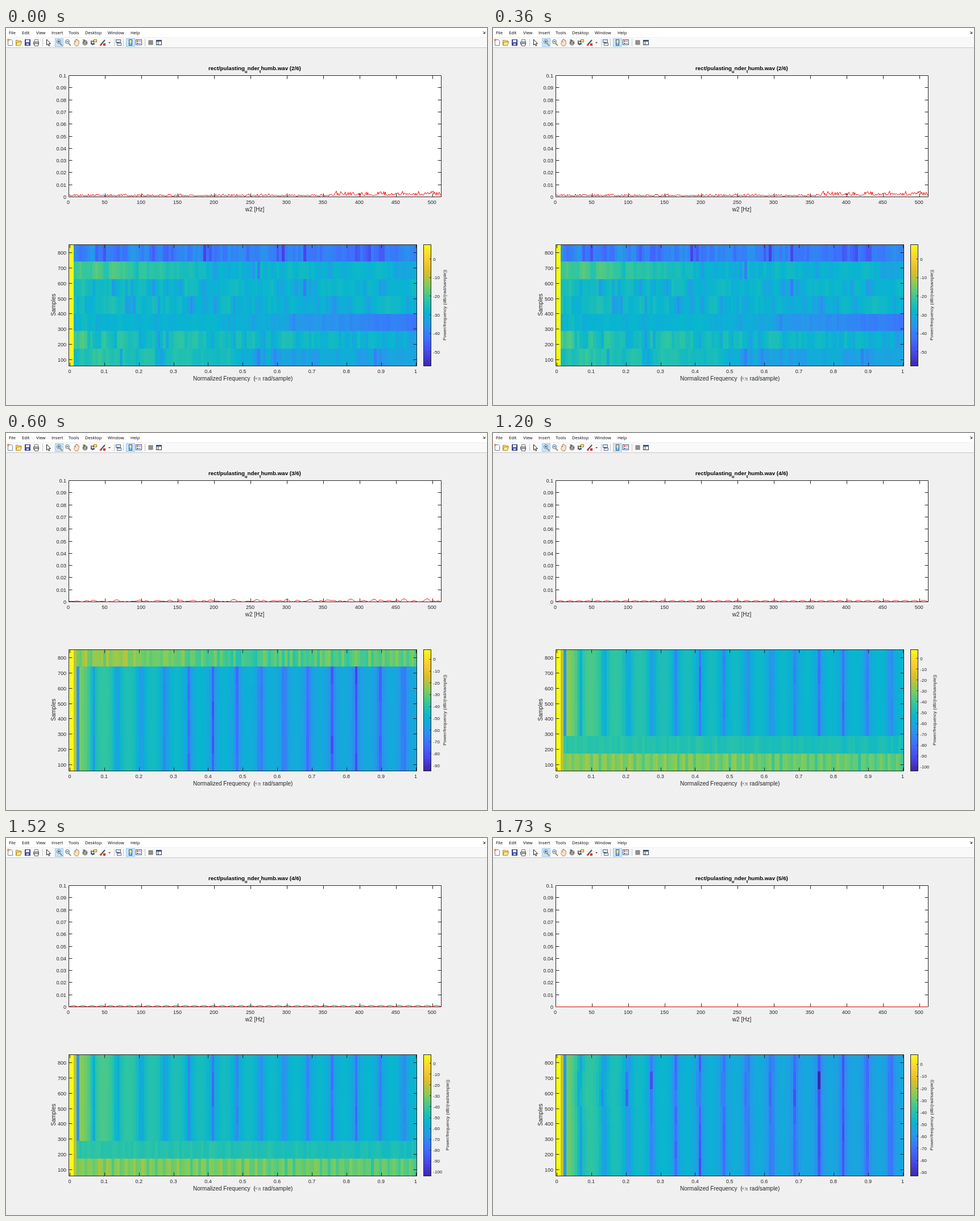
Animation of 846x662 px, one loop 2070 ms. Source, as an HTML page with a canvas:

```html
<!DOCTYPE html>
<html lang="en">
<head>
<meta charset="utf-8">
<title>Spectrum viewer</title>
<style>
html, body { margin: 0; width: 100%; height: 100%; overflow: hidden; background: #f0f0f0; }
canvas, svg { position: absolute; left: 0; top: 0; width: 846px; height: 662px; display: block; }
text { font-family: "Liberation Sans", Arial, sans-serif; fill: #262626; white-space: pre; }
.menu text { font: 7.6px "Open Sans", "Noto Sans", sans-serif; fill: #000; }
.tick { font-size: 9px; }
.label { font-size: 10px; }
.math { font: 11px "Liberation Serif", serif; fill: #555; }
.small { font-size: 8px; }
.title text { font-size: 9.75px; font-weight: bold; fill: #000; }
.title .sub { font-size: 7.6px; }
.axis { stroke: #262626; stroke-width: 1; fill: none; }
</style>
</head>
<body>
<canvas id="heat" width="846" height="662"></canvas>
<svg id="ui" viewBox="0 0 846 662"></svg>
<script>
const LOOP = 2070;
const BINS = 129, ROWS = 7, HZ = 512;
const PLOT = { x: 110, y: 83, w: 655, h: 213 };
const MAP = { x: 110, y: 380, w: 612, h: 213 };
const BIN_W = 608.5 / 128, BIN_X = 112 - BIN_W / 2;

// Start time, dB limits and content of each page
const PAGES = [
  { at: 0,    lo: -57.5,  hi: 7.7, cell: noiseCells,   height: noiseTrace },
  { at: 600,  lo: -94.8,  hi: 8.2, cell: impulseCells, height: rippleTrace },
  { at: 1200, lo: -103.7, hi: 7.9, cell: combCells,    height: combTrace },
  { at: 1730, lo: -93,    hi: 8,   cell: quietCells,   height: () => () => 0 }
];

const PARULA = ['3e26a8', '4747eb', '3e6ffe', '2797eb', '08b5d0', '31c69f', '81cc59', 'dcbd29', 'fccf30', 'f9fb15']
  .map(hex => [0, 2, 4].map(i => parseInt(hex.slice(i, i + 2), 16)));

const mix = (a, b, f) => a + (b - a) * f;
const clamp = (v, lo, hi) => Math.max(lo, Math.min(hi, v));
const dB = v => 20 * Math.log10(v);

// Evenly spaced key values, u from 0 to 1
function along(keys, u) {
  const p = u * (keys.length - 1), i = Math.min(keys.length - 2, Math.floor(p));
  return mix(keys[i], keys[i + 1], p - i);
}

function colour(v) {
  const u = clamp(v, 0, 1);
  return `rgb(${[0, 1, 2].map(c => Math.round(along(PARULA.map(p => p[c]), u))).join()})`;
}

function random(seed) {
  return () => {
    seed = (seed + 0x6D2B79F5) | 0;
    let t = Math.imul(seed ^ (seed >>> 15), 1 | seed);
    t = (t + Math.imul(t ^ (t >>> 7), 61 | t)) ^ t;
    return ((t ^ (t >>> 14)) >>> 0) / 4294967296;
  };
}

// Spectrum of a 29 sample pulse over a faint noise floor, scaled to 0..1
function pulse(page, rnd, k, drift = 0) {
  if (k < 2) return 1;
  if (k === 2) return .74;
  if (k === 3) return .34;
  const lobe = Math.abs(Math.sin(Math.PI * (k + drift) * 29 / 256));
  const level = -54 + dB((lobe + .05 * rnd()) / Math.sin(Math.PI * k / 256));
  return (level - page.lo) / (page.hi - page.lo);
}

// Each cell maker returns a rule (row, bin) -> 0..1
function noiseCells() {
  // left, middle and right level, then spread
  const bands = [
    [.30, .27, .25, .5], [.60, .44, .41, .4], [.50, .43, .42, .45], [.47, .42, .41, .5],
    [.46, .42, .22, .25], [.54, .45, .42, .55], [.54, .40, .34, .5]
  ];
  const rnd = random(41);
  const fade = v => .8 * v + 1.2 * (rnd() + rnd() + rnd() - 1.5);
  let re = 1, im = 1;
  return (r, k) => {
    re = fade(re);
    im = fade(im);
    if (k < 2) return 1;
    const [left, mid, right, spread] = bands[r];
    return along([left, mid, right], k / 128) + spread * (dB(Math.hypot(re, im) / 1.41) + 2.5) / 65;
  };
}
function impulseCells(page) {
  const rnd = random(12);
  return (r, k) => r || k < 3 ? pulse(page, rnd, k) : along([.68, .67, .58, .6, .64], k / 128) + (rnd() - .5) * .13;
}
function combCells(page) {
  const rnd = random(77);
  return (r, k) => {
    if (r < 5 || k < 3) return pulse(page, rnd, k);
    const n = (rnd() - .5) * .05;
    if (r === 5) return mix(.54, .49, k / 128) + n;
    return mix(.6, .55, k / 128) + .1 * Math.abs(Math.sin(Math.PI * k / 3.2)) + n;
  };
}
function quietCells(page) {
  const rnd = random(9);
  return (r, k) => pulse(page, rnd, k, Math.exp(-((r - 1.7) ** 2)) * .7 * (1 - k / 128));
}

// Each trace maker returns a rule (frequency) -> height in pixels
function noiseTrace() {
  const rnd = random(5);
  let last = 0;
  return f => {
    last = mix(last, rnd(), .75);
    return (.7 + 5 * last * last) * (f < 365 ? 1 : 1.8) + (f < 365 ? .5 : 1);
  };
}
function rippleTrace() {
  return f => Math.abs(Math.sin(f * .118) + .7 * Math.sin(f * .31 + .2) + .6 * Math.sin(f * .47 + 2)) * mix(1.4, 2.6, f / HZ);
}
function combTrace() {
  return f => mix(1.9, 2.5, f / HZ) * Math.abs(Math.sin(Math.PI * f / 12.8));
}

const ctx = document.getElementById('heat').getContext('2d');

function fill(style, x, y, w, h) {
  ctx.fillStyle = style;
  ctx.fillRect(x, y, w, h);
}

function drawPage(page) {
  fill('#f0f0f0', 0, 0, 846, 662);
  fill('#fff', 0, 0, 846, 17);
  fill('#f9f9f9', 0, 17, 846, 17);
  fill('#fff', PLOT.x, PLOT.y, PLOT.w, PLOT.h);
  const cell = page.cell(page);
  const edgeX = k => Math.round(BIN_X + k * BIN_W), edgeY = r => Math.round(MAP.y + r * MAP.h / ROWS);
  for (let r = 0; r < ROWS; r++)
    for (let k = 0; k < BINS; k++)
      fill(colour(cell(r, k)), edgeX(k), edgeY(r), edgeX(k + 1) - edgeX(k), edgeY(r + 1) - edgeY(r));
  for (let y = 0; y < MAP.h; y++) fill(colour(1 - y / MAP.h), 735, MAP.y + y, 13, 1);
}

const text = (x, y, s, cls = 'tick', anchor = 'middle', extra = '') =>
  `<text x="${x}" y="${y}" class="${cls}" text-anchor="${anchor}" ${extra}>${s}</text>`;
const upright = (x, y, s, cls) => text(0, 0, s, cls, 'middle', `transform="translate(${x} ${y}) rotate(-90)"`);
const path = (d, stroke, fill = 'none', w = 1) => `<path d="${d}" stroke="${stroke}" fill="${fill}" stroke-width="${w}"/>`;
const rect = (x, y, w, h, fill, stroke = 'none') => `<rect x="${x}" y="${y}" width="${w}" height="${h}" fill="${fill}" stroke="${stroke}"/>`;
const disc = (x, y, r, fill, stroke = 'none') => `<circle cx="${x}" cy="${y}" r="${r}" fill="${fill}" stroke="${stroke}"/>`;
const snap = v => Math.round(v) + .5;
const steps = (n, size, from = 0) => Array.from({ length: n }, (_, i) => from + i * size);

function axes(box, xs, ys) {
  const l = snap(box.x), t = snap(box.y), r = snap(box.x + box.w), b = snap(box.y + box.h);
  let d = `M${l} ${t}H${r}V${b}H${l}Z`;
  for (const x of xs) d += `M${snap(x)} ${t}v6M${snap(x)} ${b}v-6`;
  for (const y of ys) d += `M${l} ${snap(y)}h6M${r} ${snap(y)}h-6`;
  return `<path class="axis" d="${d}"/>`;
}

function icons() {
  const lens = (x, d) => path(`M${x + 2} 27l4 4`, '#b88746', 'none', 2) + disc(x, 24, 3.5, '#e3f2ff', '#51779b') + path(d, '#235');
  return [
    rect(86.5, 18.5, 14, 14, '#cce4f7', '#9bcaef'), rect(211.5, 18.5, 15, 14, '#cce4f7', '#9bcaef'),
    path('M3.5 20.5h6l2 2v8h-8z', '#6d8299', '#fff'), disc(4, 21, 2, '#e58b43'),
    path('M17.5 30.5v-9h4l1 1h4v2', '#b88a25', '#f8d56b'), path('M17.5 30.5l2-6h8l-2 6z', '#b88a25', '#ffe58f'),
    rect(33.5, 20.5, 9, 10, '#4550a8', '#303878'), rect(35, 21, 6, 4, '#eef'), rect(36, 27, 4, 3, '#ccd'),
    rect(50.5, 20.5, 6, 4, '#fff', '#777'), rect(48.5, 24.5, 9, 4, '#b9bec5', '#555'), rect(50.5, 27.5, 6, 4, '#fff', '#666'),
    path('M71.5 20v10l2.3-2 1.5 3.5 1.6-.7-1.5-3.4h3z', '#222', '#fff'),
    lens(93, 'M91 24h4M93 22v4'), lens(108, 'M106 24h4'),
    path('M121 25l-1-2 1-.5 1.5 2v-4h1v-1h1v1h1.3v1h1.4v1h1v5l-2 4h-4l-3-4z', '#9a704f', '#fbe1c5', .8),
    disc(139, 26, 4, '#ddd', '#555'), path('M135 21l4 0-2 3M136 26l3-2 3 2-3 2z', '#333'),
    path('M150 22v6h6M153 25v-3', '#222', 'none', 1.4), rect(154.5, 20.5, 5, 4, '#ffe476', '#927e2f'), path('M152 30l3-4', '#24559b', 'none', 1.5),
    path('M167 29l7-8', '#555', 'none', 2), path('M165 30q2-4 4-1q-2 3-4 1', '#b44', '#d44'), rect(171, 27, 4, 4, '#d91e1e'),
    path('M180 25h4l-2 2z', 'none', '#333'),
    rect(193.5, 20.5, 8, 5, '#dce8f6', '#536b8c'), rect(195.5, 26.5, 7, 4, '#fff', '#536b8c'), path('M195 25l4 2', '#222'),
    rect(216.5, 20.5, 5, 10, '#ffe38b', '#31588e'), rect(217, 26, 4, 4, '#7bc7e5'),
    rect(228.5, 20.5, 10, 9, '#fff', '#445c83'), rect(230, 22, 3, 2, '#d33'), rect(230, 26, 3, 2, '#36b'), path('M234 23h3M234 27h3', '#444'),
    rect(251, 22, 7, 7, '#929292', '#777'),
    rect(264.5, 21.5, 9, 8, '#fff', '#27364f'), rect(265, 22, 9, 2, '#4c6589'), path('M267.5 24v5', '#27364f'),
    path('M64.5 19v13M190.5 19v13M206.5 19v13M244.5 19v13', '#c5c5c5')
  ].join('');
}

function chrome() {
  const menu = { File: 5, Edit: 28, View: 53, Insert: 80, Tools: 110, Desktop: 139, Window: 179, Help: 219 };
  let s = '<g class="menu">' + Object.entries(menu).map(([name, x]) => text(x, 11, name, '', 'start')).join('') + '</g>';
  s += path('M839 6l3 3M842.5 6.5v3h-3', '#333');
  s += path('M0 16.5H846', '#f0f0f0') + path('M0 34.5H846', '#c8c8c8') + icons();

  const hz = steps(11, 50), tenths = steps(11, .1);
  const px = v => PLOT.x + v * PLOT.w / HZ, py = v => PLOT.y + PLOT.h * (1 - v);
  s += axes(PLOT, hz.slice(1).map(px), tenths.slice(1, 10).map(py));
  for (const v of hz) s += text(px(v) - .4, 309, v);
  for (const v of tenths) s += text(106, py(v) + 4, +(v / 10).toFixed(2), 'tick', 'end');
  s += text(437.5, 322, 'w2 [Hz]', 'label');

  const mx = v => 112 + v * 608.5, my = v => 581.5 - (v - 100) * .2675;
  const samples = steps(8, 100, 100);
  s += axes(MAP, tenths.map(mx), samples.map(my));
  for (const v of tenths) s += text(mx(v), 606, +v.toFixed(1));
  for (const v of samples) s += text(106, my(v) + 4, v, 'tick', 'end');
  s += upright(87, 486, 'Samples', 'label');
  s += text(329, 619, 'Normalized Frequency  (', 'label', 'start') + text(436.5, 619, '×π', 'math', 'start') +
    text(451.5, 619, 'rad/sample)', 'label', 'start');
  s += rect(734.5, 380.5, 13, 213, 'none', '#262626');

  s += '<g class="title">' + text(356, 74, 'rect/pulasting', '', 'start') + text(419.8, 79, 'u', 'sub', 'start') +
    text(424.6, 74, 'nder', '', 'start') + text(445.8, 79, 't', 'sub', 'start') +
    text(448.4, 74, '', '', 'start', 'id="count"') + '</g>';
  return s + '<g id="scale"></g><path id="trace" stroke="#f00" fill="none" stroke-linejoin="round"/>';
}

document.getElementById('ui').innerHTML = chrome();
const [count, scale, trace] = ['count', 'scale', 'trace'].map(id => document.getElementById(id));

function show(index) {
  const page = PAGES[index], height = page.height();
  drawPage(page);
  count.textContent = `humb.wav (${index + 2}/6)`;
  let s = '';
  for (let v = 0; v > page.lo; v -= 10) {
    const y = MAP.y + MAP.h * (page.hi - v) / (page.hi - page.lo);
    s += path(`M748 ${snap(y)}h-3`, '#262626') + text(751.3, y + 3.5, v, 'small', 'start');
  }
  // The label moves aside for three digit ticks
  scale.innerHTML = s + upright(page.lo < -100 ? 778.5 : 774, 486.5, 'Power/frequency (dB/(rad/sample))', 'small');
  const points = steps(HZ + 1, 1).map(f =>
    `${(PLOT.x + .5 + f * PLOT.w / HZ).toFixed(2)} ${(PLOT.y + PLOT.h + .5 - height(f)).toFixed(2)}`);
  trace.setAttribute('d', 'M' + points.join('L'));
}

let current = -1;
const start = performance.now();
function tick() {
  const t = (performance.now() - start) % LOOP;
  const index = PAGES.filter(page => page.at <= t).length - 1;
  if (index !== current) show(current = index);
  requestAnimationFrame(tick);
}
tick();
</script>
</body>
</html>
```
